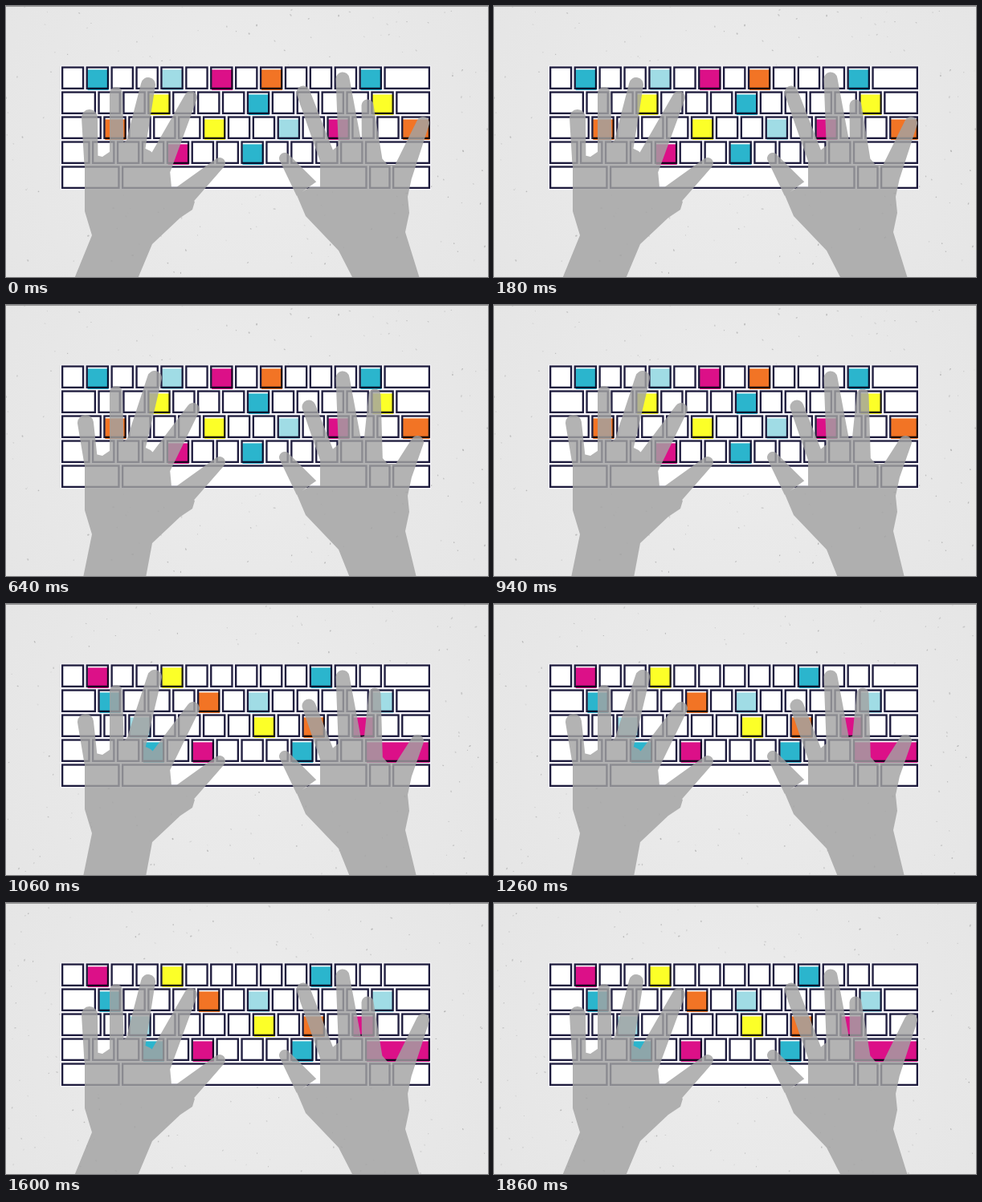
Write an HTML page with a canvas that moves like this. It is 600 px wide and 338 px high and loops after 1.88 s.

```html
<!DOCTYPE html>
<html lang="en">
<head>
<meta charset="utf-8">
<title>Typing hands</title>
<style>
html, body { margin: 0; width: 100%; height: 100%; overflow: hidden; background: #e7e7e7; }
canvas { display: block; width: 600px; height: 338px; }
</style>
</head>
<body>
<canvas id="stage" width="600" height="338"></canvas>
<script>
const ctx = document.getElementById('stage').getContext('2d');
const LOOP = 1880, FIRST = 600, STEP = 420;
const INK = { b: '#2bb5cd', l: '#a0dce5', p: '#dc1088', o: '#f27425', y: '#fcff28' };
const LEFT = 69, RIGHT = 528, TOP = 75.4, PITCH = 30.9, GAP = 2.4, LINE = 2.3;

// Coloured keys: one string per row, one character per key.
const layouts = [
  ['.b..l.p.o...b.', '.y.', '', ''],
  ['.p..y.....b...', '', '', '']
];
layouts[0] = ['.b..l.p.o...b.', '...y...b....y.', '.o...y..l.p..o', '....p..b.....'];
layouts[1] = ['.p..y.....b...', '.b...o.l....l.', '..l....y.o.p..', '...b.p...b..p'];

// A row is the list of key edges; regular keys follow a wider first one.
const regular = (start, count) => [LEFT, ...Array.from({ length: count + 1 }, (_, i) => start + i * PITCH), RIGHT + GAP];
const rows = [
  regular(99.6, 12), regular(114.4, 12), regular(121.3, 12), regular(107, 11),
  [LEFT, 144, 452, 481, RIGHT + GAP]
];

function drawKey(x, y, w, h, ink) {
  ctx.fillStyle = '#fff';
  ctx.fillRect(x, y, w, h);
  ctx.strokeStyle = '#1d1b3d';
  ctx.lineWidth = LINE;
  ctx.strokeRect(x + LINE / 2, y + LINE / 2, w - LINE, h - LINE);
  if (!ink) return;
  ctx.globalCompositeOperation = 'multiply';
  ctx.fillStyle = ink;
  ctx.fillRect(x + 2, y + 4, w - 2.5, h - 3);
  ctx.globalCompositeOperation = 'source-over';
}

function drawKeyboard(layout) {
  ctx.fillStyle = '#f6f4f9';
  ctx.fillRect(LEFT - 1, TOP - 1, RIGHT - LEFT + 2, 155);
  rows.forEach((edges, r) => {
    for (let i = 0; i < edges.length - 1; i++) {
      const w = edges[i + 1] - edges[i] - GAP;
      drawKey(edges[i], TOP + 31 * r, w, 28.6, INK[(layout[r] || '')[i]]);
    }
  });
}

// A tapered finger with a round tip at (x, y), its base at (bx, by).
function addFinger(path, [x, y, r], [bx, by, br]) {
  const a = Math.atan2(y - by, x - bx), q = Math.PI / 2;
  path.moveTo(bx + br * Math.cos(a - q), by + br * Math.sin(a - q));
  path.arc(x, y, r, a - q, a + q);
  path.lineTo(bx + br * Math.cos(a + q), by + br * Math.sin(a + q));
  path.closePath();
}

function makeHand(tips, bases, palm) {
  const path = new Path2D();
  tips.forEach((tip, i) => addFinger(path, tip, bases[i]));
  palm.forEach((p, i) => i ? path.lineTo(...p) : path.moveTo(...p));
  path.closePath();
  return path;
}

// Fingers run from left to right; only tips and wrist depend on the pose.
const leftHand = (pinky, middle, index, wrist) => makeHand(
  [pinky, [137, 109, 8], middle, index, [266, 196, 7]],
  [[106, 198, 8.5], [138, 190, 9], [160, 180, 13], [190, 200, 16], [222, 236, 14]],
  [[98, 192], [107, 185], [120, 188], [151, 167], [180, 181], [204, 205], [206, 226], [214, 226],
    [235, 244], [232, 254], [217, 264], [182, 297], ...wrist, [107, 286], [98, 256]]);

const rightHand = (index, ring, pinky, wrist) => makeHand(
  [[347, 190, 7], index, [419, 91, 8.5], ring, pinky],
  [[374, 228, 15], [401, 192, 10], [429, 180, 15], [456, 195, 13], [493, 210, 13]],
  [[391, 193], [416, 172], [446, 165], [475, 198], [486, 198], [506, 210], [500, 238], [502, 258],
    [497, 282], ...wrist, [414, 305], [373, 262], [362, 236], [378, 226], [391, 226]]);

const poses = [
  [leftHand([104, 139, 10], [177, 98, 9], [230, 114, 8], [[164, 340], [85, 340]]),
    rightHand([370, 108, 8.5], [450, 124, 7.5], [519, 146, 8], [[515, 340], [432, 340]])],
  [leftHand([99, 147, 10], [185, 91, 9], [233, 130, 8], [[174, 340], [96, 340]]),
    rightHand([377, 127, 8.5], [459, 112, 7.5], [512, 171, 8], [[511, 340], [428, 340]])]
];

function random(seed) {
  return () => (seed = (seed * 16807) % 2147483647) / 2147483647;
}

function drawPaper(seed) {
  const glow = ctx.createRadialGradient(300, 165, 60, 300, 169, 370);
  glow.addColorStop(0, '#ebebeb');
  glow.addColorStop(1, '#e5e5e5');
  ctx.fillStyle = glow;
  ctx.fillRect(0, 0, 600, 338);
  const rnd = random(seed);
  for (let i = 0; i < 220; i++) {
    const x = rnd() * 600, y = rnd() * 338, r = 0.4 + rnd() * 0.5;
    ctx.fillStyle = `rgba(120,120,120,${0.1 + rnd() * 0.35})`;
    ctx.beginPath();
    ctx.ellipse(x, y, r * (1 + rnd()), r, rnd() * 3, 0, Math.PI * 2);
    ctx.fill();
  }
  ctx.fillStyle = '#959595';
  ctx.fillRect(0, 0, 600, 1);
}

// Phases: rest, reach, reach with new colours, rest with new colours.
function drawScene(phase) {
  const colours = phase < 2 ? 0 : 1, reach = phase === 1 || phase === 2 ? 1 : 0;
  drawPaper(71 + 452 * Math.max(0, phase - 1));
  drawKeyboard(layouts[colours]);
  ctx.fillStyle = 'rgba(163,163,163,0.82)';
  for (const hand of poses[reach]) ctx.fill(hand);
}

function frame(now) {
  const t = now % LOOP;
  drawScene(t < FIRST ? 0 : Math.min(3, 1 + Math.floor((t - FIRST) / STEP)));
  requestAnimationFrame(frame);
}
drawScene(0);
requestAnimationFrame(frame);
</script>
</body>
</html>
```
